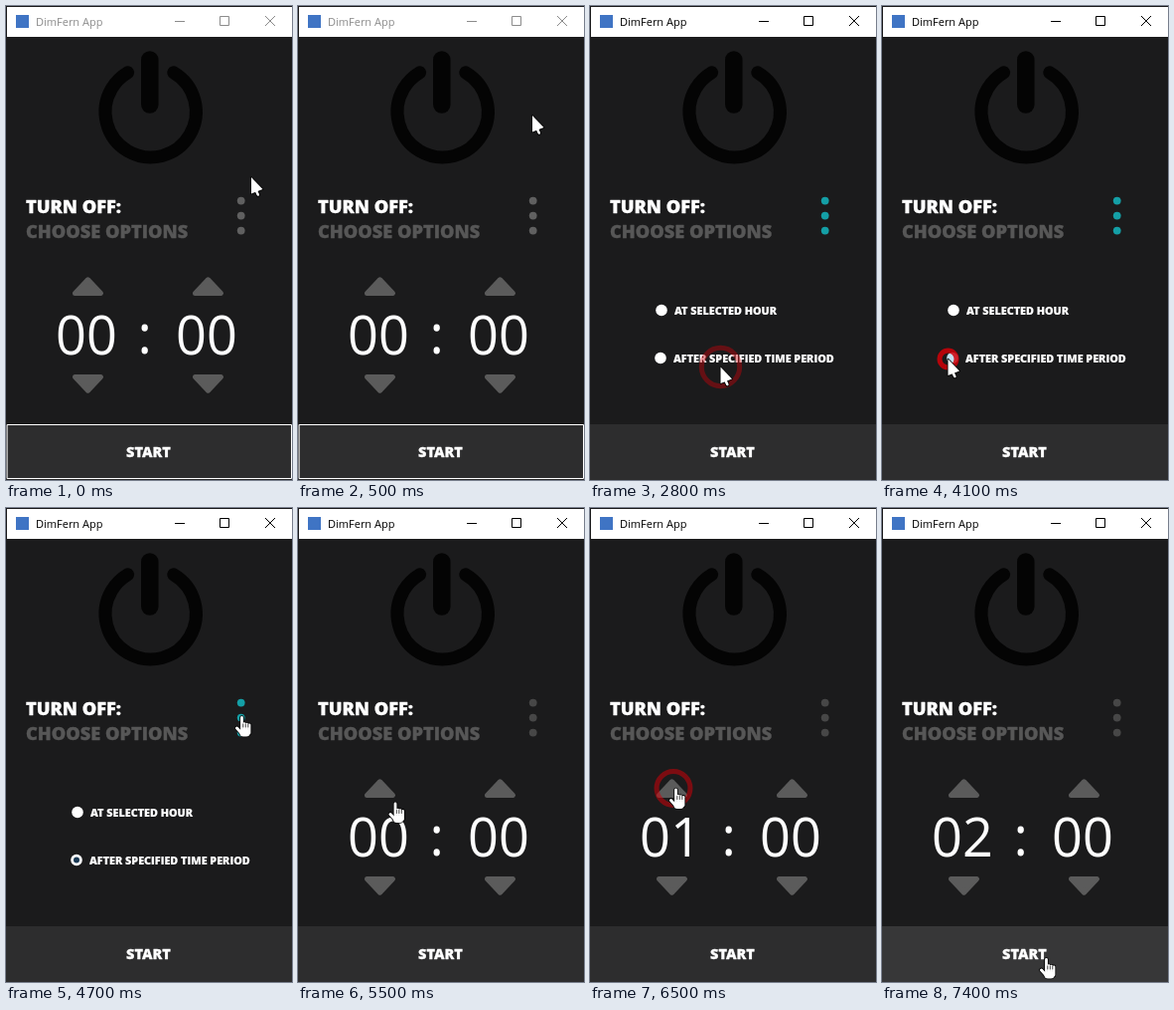
Animation of 288 by 476 pixels, one loop 8000 ms. Source, as an HTML page with a canvas:

```html
<!DOCTYPE html>
<html lang="en">
<head>
<meta charset="utf-8">
<title>Shutdown timer</title>
<style>
  html, body { margin: 0; width: 100%; height: 100%; overflow: hidden; background: #1b1b1c; }
  canvas { display: block; }
</style>
</head>
<body>
<canvas id="stage" width="288" height="476"></canvas>
<script>
const ctx = document.getElementById('stage').getContext('2d');
const LOOP = 8000, STEP = 100, RING_LIFE = 600;
const SANS = '"Open Sans", "Noto Sans", sans-serif';

// Each move eases the pointer from where it rests to a new place.
const home = { x: 247, y: 172 };
const moves = [
  { at: 0, span: 500, x: 236, y: 110 },
  { at: 2000, span: 180, x: 236, y: 209 },
  { at: 2300, span: 250, x: 131.5, y: 362.5 },
  { at: 3300, span: 750, x: 66.5, y: 354.5 },
  { at: 4200, span: 500, x: 235, y: 209 },
  { at: 5200, span: 300, x: 95.5, y: 295.5 },
  { at: 5500, span: 150, x: 84, y: 281.5 },
  { at: 7000, span: 400, x: 163, y: 452 }
];
const clickTimes = [2180, 2580, 4100, 5650, 6350];

function pointerAt(t) {
  let { x, y } = home;
  for (const move of moves) {
    const u = Math.min(1, Math.max(0, (t - move.at) / move.span));
    const eased = u * u * (3 - 2 * u);
    x += (move.x - x) * eased;
    y += (move.y - y) * eased;
  }
  return { x, y };
}

function rect(color, x, y, w, h) {
  ctx.fillStyle = color;
  ctx.fillRect(x, y, w, h);
}

function disc(color, x, y, r) {
  ctx.fillStyle = color;
  ctx.beginPath();
  ctx.arc(x, y, r, 0, 2 * Math.PI);
  ctx.fill();
}

function ring(color, width, x, y, r, from = 0, to = 2 * Math.PI) {
  ctx.strokeStyle = color;
  ctx.lineWidth = width;
  ctx.beginPath();
  ctx.arc(x, y, r, from, to);
  ctx.stroke();
}

function line(color, width, x1, y1, x2, y2) {
  ctx.strokeStyle = color;
  ctx.lineWidth = width;
  ctx.beginPath();
  ctx.moveTo(x1, y1);
  ctx.lineTo(x2, y2);
  ctx.stroke();
}

function triangle(color, width, x1, y1, x2, y2, x3, y3) {
  ctx.fillStyle = ctx.strokeStyle = color;
  ctx.lineWidth = width;
  ctx.beginPath();
  ctx.moveTo(x1, y1);
  ctx.lineTo(x2, y2);
  ctx.lineTo(x3, y3);
  ctx.closePath();
  ctx.fill();
  if (width) ctx.stroke();
}

function text(str, x, y, font, color, align = 'left') {
  ctx.font = `${font} ${SANS}`;
  ctx.textAlign = align;
  ctx.fillStyle = color;
  ctx.fillText(str, x, y);
}

function heavyText(str, x, y, size, color, align) {
  text(str, x, y, `800 ${size}px`, color, align);
  ctx.strokeStyle = color;
  ctx.lineWidth = size * .02;
  ctx.strokeText(str, x, y);
}

function drawTitleBar(active) {
  const ink = active ? '#000' : '#8c8c8c';
  rect('#fff', 1, 1, 287, 30);
  rect('#3f74c4', 10, 9, 13, 13);
  text('DimFern App', 30, 20, '11px', ink);
  ctx.lineCap = 'butt';
  line(ink, 1, 170, 15.5, 180, 15.5);
  ctx.strokeRect(215.5, 10.5, 9, 9);
  line(ink, 1, 261, 10, 271, 20);
  line(ink, 1, 271, 10, 261, 20);
  ctx.lineCap = 'round';
}

function drawPowerSymbol() {
  const gap = .53, top = -Math.PI / 2;
  ring('#040404', 13, 145.7, 106.2, 45.7, top + gap, top - gap + 2 * Math.PI);
  line('#040404', 17.5, 144.8, 54, 144.8, 99);
}

function drawOptions(t) {
  const hovered = t >= 4000 && t < 4300;
  disc('#fff', 72, 305.5, 5.8);
  disc(hovered ? '#c4dff0' : '#fff', 71, 353.5, 5.8);
  if (t >= 4300) disc('#1b3a55', 71, 353.5, 3);
  heavyText('AT SELECTED HOUR', 85, 310, 10.8, '#fff');
  heavyText('AFTER SPECIFIED TIME PERIOD', 84, 358, 10.8, '#fff');
}

function drawClock(hours) {
  for (const x of [82.5, 203.5]) {
    for (const [apex, base] of [[274.8, 288.5], [386.2, 372.5]]) {
      triangle('#5b5b5b', 5, x, apex, x + 13, base, x - 13, base);
    }
  }
  text(String(hours).padStart(2, '0'), 50, 350, '54px', '#fff');
  text(':', 139.8, 349, '54px', '#fff', 'center');
  text('00', 171, 350, '54px', '#fff');
}

function drawRings(t) {
  for (const start of clickTimes) {
    const age = t - start;
    if (age < 0 || age >= RING_LIFE) continue;
    const { x, y } = pointerAt(start);
    ctx.globalAlpha = .85 * (1 - age / RING_LIFE) ** 1.6;
    ring('#d00008', 5, x, y, 8.5 + 16 * (1 - Math.exp(-age / 200)));
    ctx.globalAlpha = 1;
  }
}

function arrowLayer(color, edge) {
  triangle(color, edge, 0, 0, 0, 16.5, 11.5, 12);
  line(color, 2.6 + edge, 4.2, 12, 6.8, 17.5);
}

function handLayer(color, edge) {
  for (let i = 0; i < 4; i++) {
    const x = 2.5 + 2.5 * i;
    line(color, 2.8 + edge, x, i ? 7 + .6 * i : 1.5, x, 17);
  }
  line(color, 3 + edge, -2.5, 12, 2, 17);
  line(color, 7 + edge, 4, 17, 7, 17);
}

function drawPointer({ x, y }, hand) {
  const layer = hand ? handLayer : arrowLayer;
  ctx.save();
  ctx.translate(x, y);
  layer('#000', 1.6);
  layer('#fff', 0);
  if (hand) for (let i = 0; i < 3; i++) line('#000', .7, 3.8 + 2.5 * i, 8, 3.8 + 2.5 * i, 11);
  ctx.restore();
}

function draw(t) {
  const active = t >= 2300;
  const options = active && t < 5100;
  const pointer = pointerAt(t);

  rect('#1b1b1c', 0, 0, 288, 476);
  drawTitleBar(active);
  drawPowerSymbol();

  heavyText('TURN OFF:', 20, 208, 18.2, '#fff');
  heavyText('CHOOSE OPTIONS', 20, 233, 18.2, '#575757');
  const dotColor = options ? '#149fa6' : active ? '#474747' : '#606060';
  for (let i = 0; i < 3; i++) disc(dotColor, 236.7, 195.6 + 15 * i, 3.9);

  if (options) drawOptions(t);
  else drawClock(t < 5900 ? 0 : t < 6600 ? 1 : 2);

  rect(pointer.y > 420 ? '#373738' : '#2d2d2e', 0, 420, 288, 56);
  if (!active) {
    ctx.strokeStyle = '#fff';
    ctx.lineWidth = 1;
    ctx.strokeRect(1.5, 420.5, 286, 54);
  }
  heavyText('START', 143.5, 453, 14.5, '#fff', 'center');

  drawRings(t);
  drawPointer(pointer, t >= 4600 || (t >= 2200 && t <= 2300));
}

ctx.lineJoin = ctx.lineCap = 'round';
function tick() {
  const t = performance.now() % LOOP;
  draw(Math.floor(t / STEP) * STEP);
  requestAnimationFrame(tick);
}
tick();
</script>
</body>
</html>
```
